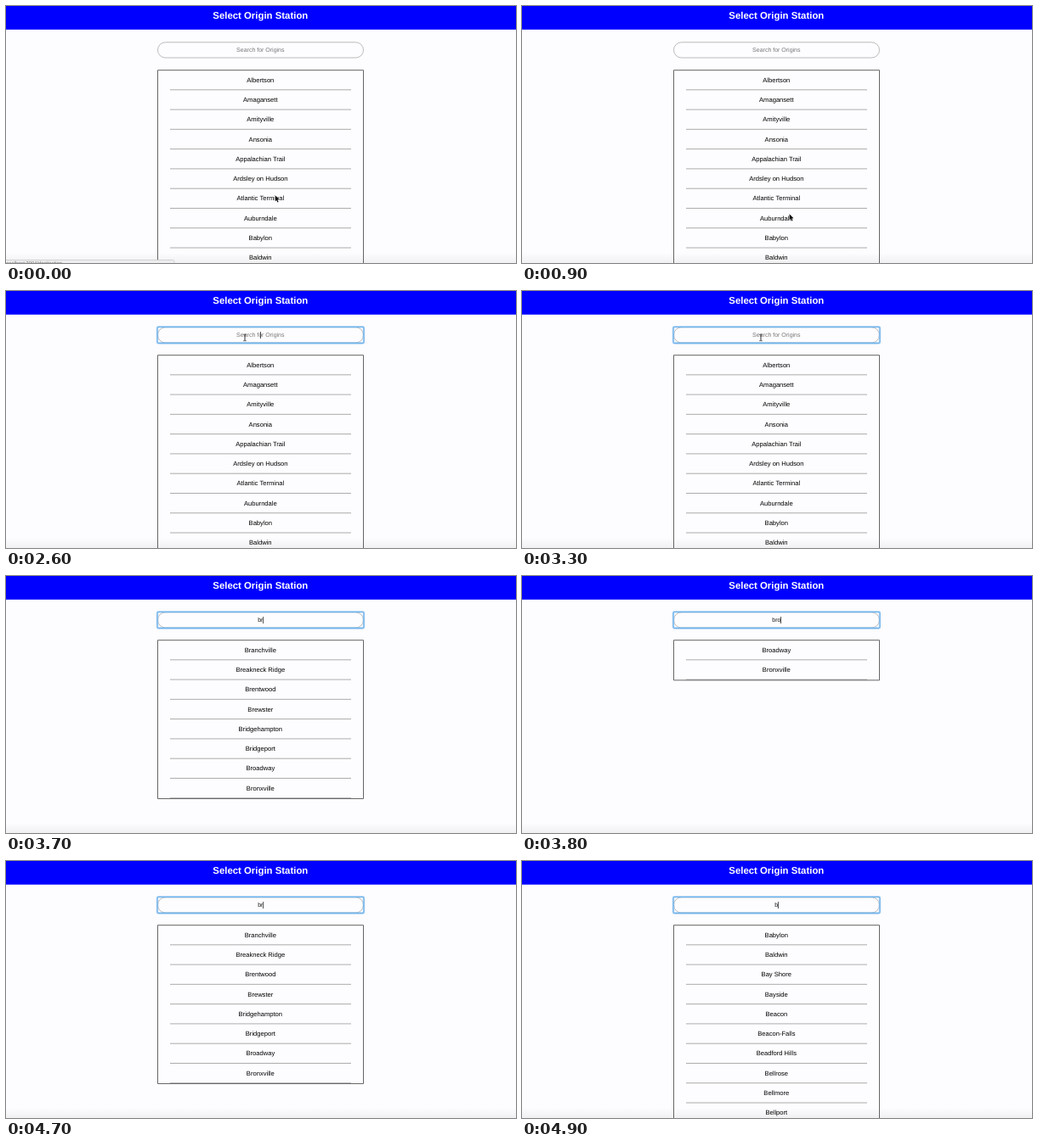
Animation, 600 px wide and 303 px high, one loop 5.1 s. Source, as an HTML page with a canvas:

```html
<!DOCTYPE html>
<html lang="en">
<head>
<meta charset="utf-8">
<title>Select Origin Station</title>
<style>
html, body { margin: 0; width: 100%; height: 100%; overflow: hidden; background: #fdfcfe; }
canvas { display: block; width: 600px; height: 303px; }
</style>
</head>
<body>
<canvas id="stage" width="600" height="303"></canvas>
<script>
const ctx = document.getElementById('stage').getContext('2d');
const W = 600, H = 303, LOOP = 5100;
const MID = 299.3, LEFT = 178.5, RIGHT = 420.5, TOP = 75.7, ROW = 23.28;
const FACE = '"Liberation Sans", Arial, sans-serif';

const STATIONS = [
  'Albertson', 'Amagansett', 'Amityville', 'Ansonia', 'Appalachian Trail',
  'Ardsley on Hudson', 'Atlantic Terminal', 'Auburndale', 'Babylon', 'Baldwin',
  'Bay Shore', 'Bayside', 'Beacon', 'Beacon-Falls', 'Beadford Hills', 'Bellrose',
  'Bellmore', 'Bellport', 'Branchville', 'Breakneck Ridge', 'Brentwood',
  'Brewster', 'Bridgehampton', 'Bridgeport', 'Broadway', 'Bronxville'
];

// [start, value] steps
const QUERY = [[0, ''], [3500, 'b'], [3700, 'br'], [3800, 'bro'], [4000, 'broa'],
  [4600, 'bro'], [4700, 'br'], [4900, 'b']];
const CARET = [[0, false], [2600, true], [3100, false], [3500, true], [4400, false], [4600, true]];
const POINTER = [
  [0, ['arrow', 316.7, 223.3]], [300, ['arrow', 316.3, 238.5]],
  [600, ['arrow', 315.9, 240]], [700, ['arrow', 315.4, 242]],
  [800, ['arrow', 315, 244]], [900, ['arrow', 314.6, 245.3]],
  [1100, ['arrow', 283.3, 173]], [1300, ['arrow', 256.5, 49.5]],
  [1500, ['arrow', 260.5, 51.5]], [1600, ['arrow', 263.3, 53.7]],
  [2100, ['beam', 274, 54]], [2200, ['beam', 281, 55]], [3500, null]
];

function at(steps, t) {
  let value;
  for (const [start, v] of steps) if (t >= start) value = v;
  return value;
}

function text(str, x, y, size, color, weight = '', align = 'center') {
  ctx.font = `${weight} ${size}px ${FACE}`;
  ctx.textAlign = align;
  ctx.fillStyle = color;
  ctx.fillText(str, x, y);
}

function box(x, y, w, h, r, color, width) {
  ctx.beginPath();
  ctx.roundRect(x, y, w, h, r);
  ctx.strokeStyle = color;
  ctx.lineWidth = width;
  ctx.stroke();
}

function line(x1, y1, x2, y2, color, width) {
  ctx.beginPath();
  ctx.moveTo(x1, y1);
  ctx.lineTo(x2, y2);
  ctx.strokeStyle = color;
  ctx.lineWidth = width;
  ctx.stroke();
}

function drawHeader() {
  ctx.fillStyle = '#0000ff';
  ctx.fillRect(0, 0, W, 27.8);
  text('Select Origin Station', MID, 15, 11.4, '#fff', 'bold');
}

function drawSearch(query, focused, caret) {
  box(LEFT, 42.8, RIGHT - LEFT, 18.2, 9.1, '#bbb', 1);
  if (focused) {
    box(LEFT - 0.5, 42.3, RIGHT - LEFT + 1, 19.2, 1.5, 'rgba(110,180,240,.4)', 2.6);
    box(LEFT - 0.5, 42.3, RIGHT - LEFT + 1, 19.2, 1.5, '#72b4ea', 1.3);
  }
  if (query) text(query, MID, 54.4, 7, '#111');
  else text('Search for Origins', MID, 54.4, 7, '#767676');
  if (caret) {
    const x = MID + (query ? ctx.measureText(query).width / 2 : 0);
    line(x + 0.2, 48, x + 0.2, 56, '#222', 0.8);
  }
}

function drawList(query) {
  const names = STATIONS.filter(n => n.toLowerCase().startsWith(query));
  const count = Math.min(names.length, 10);
  for (let i = 0; i < count; i++) {
    const y = TOP + i * ROW;
    text(names[i], MID, y + 14, 7.6, '#000');
    line(193, y + 23.1, 406, y + 23.1, '#999', 0.8);
  }
  box(LEFT, TOP, RIGHT - LEFT, names.length * ROW + 0.6, 0, '#555', 0.9);
}

function drawFooter(linkHovered) {
  const shade = ctx.createLinearGradient(0, 291, 0, H);
  shade.addColorStop(0, 'rgba(0,0,0,0)');
  shade.addColorStop(1, 'rgba(0,0,0,.05)');
  ctx.fillStyle = shade;
  ctx.fillRect(0, 291, W, 12);
  if (!linkHovered) return;
  ctx.beginPath();
  ctx.roundRect(-4, 299.5, 202, 12, 2);
  ctx.fillStyle = '#eeedef';
  ctx.fill();
  box(-4, 299.5, 202, 12, 2, '#ccc', 0.8);
  text('localhost:3004/destination', -1, 305, 5.8, '#777', '', 'left');
}

function drawPointer(pointer) {
  if (!pointer) return;
  const [kind, x, y] = pointer;
  if (kind === 'beam') {
    line(x, y - 3.5, x, y + 3.5, '#333', 1);
    line(x - 1.8, y - 3.7, x + 1.8, y - 3.7, '#444', 0.8);
    line(x - 1.8, y + 3.7, x + 1.8, y + 3.7, '#444', 0.8);
    return;
  }
  const tip = [[0, 0], [0, 7], [1.6, 5.6], [2.7, 8.2], [3.9, 7.7], [2.8, 5.2], [4.9, 5]];
  ctx.beginPath();
  for (const [dx, dy] of tip) ctx.lineTo(x + dx, y + dy);
  ctx.closePath();
  ctx.strokeStyle = '#fff';
  ctx.lineWidth = 1;
  ctx.stroke();
  ctx.fillStyle = '#111';
  ctx.fill();
}

function draw(t) {
  const query = at(QUERY, t);
  ctx.fillStyle = '#fdfcfe';
  ctx.fillRect(0, 0, W, H);
  drawHeader();
  drawSearch(query, t >= 2600, at(CARET, t));
  drawList(query);
  drawFooter(t < 300);
  drawPointer(at(POINTER, t));
}

ctx.textRendering = 'geometricPrecision';
const begin = performance.now();
function tick() {
  draw((performance.now() - begin) % LOOP);
  requestAnimationFrame(tick);
}
tick();
</script>
</body>
</html>
```
